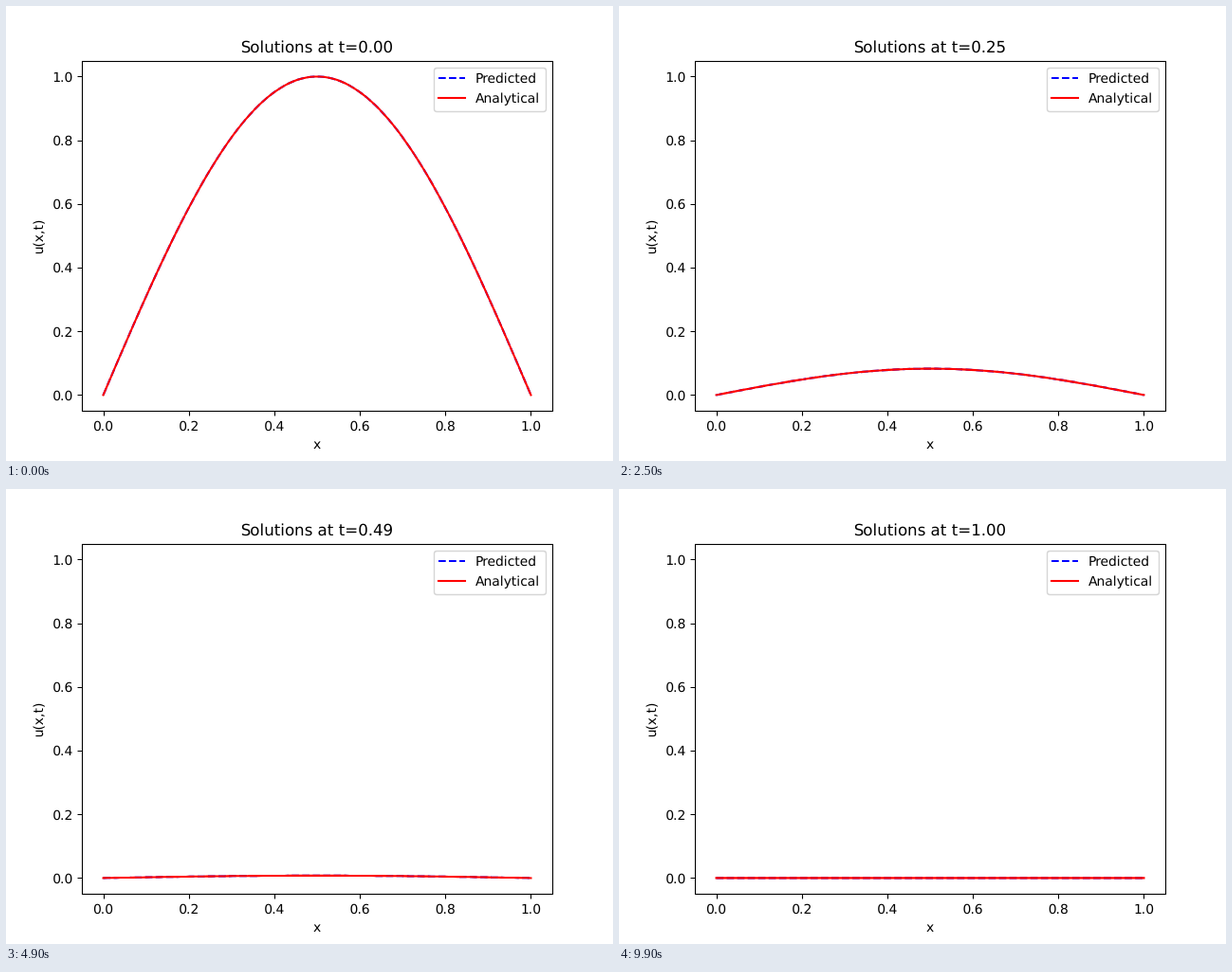
An HTML page that plays this animation: 640x480 px, repeating every 10 s.

```html
<!DOCTYPE html>
<html lang="en">
<head>
<meta charset="utf-8">
<title>Heat equation solutions</title>
<style>
  html, body { margin: 0; width: 100%; height: 100%; overflow: hidden; background: #fff; }
  svg { display: block; }
  text { font: 13.889px "DejaVu Sans", sans-serif; text-anchor: middle; text-rendering: geometricPrecision; }
  #title { font-size: 16.667px; }
  .end { text-anchor: end; }
  .start { text-anchor: start; }
  .axis { fill: none; stroke: #000; stroke-width: 1.111; }
  .line { fill: none; stroke-width: 2.083; stroke-linejoin: round; }
  .predicted { stroke: #00f; stroke-dasharray: 7.708 3.333; }
  .analytical { stroke: #f00; stroke-linecap: square; }
</style>
</head>
<body>
<svg width="640" height="480" viewBox="0 0 640 480">
  <g id="ticks"></g>
  <path class="line predicted curve"/>
  <path class="line analytical curve"/>
  <rect class="axis" x="80.5" y="58.5" width="496" height="369"/>
  <text id="title" x="328" y="49" dx="0 -1"></text>
  <text x="328" y="467">x</text>
  <text transform="translate(39 244) rotate(-90)" dx="0 -1">u(x,t)</text>
  <rect x="451.5" y="65.5" width="118" height="46" rx="2.78" fill="#fff" fill-opacity=".8" stroke="#d6d6d6" stroke-width="1.389"/>
  <path class="line predicted" d="M456 76H484"/>
  <path class="line analytical" d="M456 97H484"/>
  <text class="start" x="495" y="81" dx="0 -1">Predicted</text>
  <text class="start" x="495" y="102" dx="0 -1">Analytical</text>
</svg>
<script>
const STEPS = 100, STEP_MS = 100, POINTS = 100;
const px = x => 102.545 + 450.909 * x;
const py = u => 410.4 - 336 * u;
const title = document.getElementById('title');
const curves = document.querySelectorAll('.curve');

let ticks = '';
for (let i = 0; i <= 5; i++) {
  const label = (i / 5).toFixed(1);
  const x = px(i / 5), y = py(i / 5);
  ticks += `<path class="axis" d="M${Math.round(x) + .5} 427.5v5M80.5 ${Math.round(y) + .5}h-5"/>
    <text x="${x}" y="448" dx="0 -1">${label}</text>
    <text class="end" x="70.3" y="${Math.round(y + 5.3)}" dx="0 -1">${label}</text>`;
}
document.getElementById('ticks').innerHTML = ticks;

// u(x,t) = exp(-pi² t) sin(pi x)
function curvePath(t) {
  const peak = Math.exp(-Math.PI * Math.PI * t);
  const points = Array.from({ length: POINTS }, (_, i) => {
    const x = i / (POINTS - 1);
    return px(x).toFixed(3) + ' ' + py(peak * Math.sin(Math.PI * x)).toFixed(3);
  });
  return 'M' + points.join('L');
}

let shown = -1;
function draw() {
  const step = Math.floor(performance.now() / STEP_MS) % STEPS;
  if (step !== shown) {
    shown = step;
    const t = step / (STEPS - 1);
    title.textContent = `Solutions at t=${t.toFixed(2)}`;
    curves.forEach(c => c.setAttribute('d', curvePath(t)));
  }
  requestAnimationFrame(draw);
}
draw();
</script>
</body>
</html>
```
